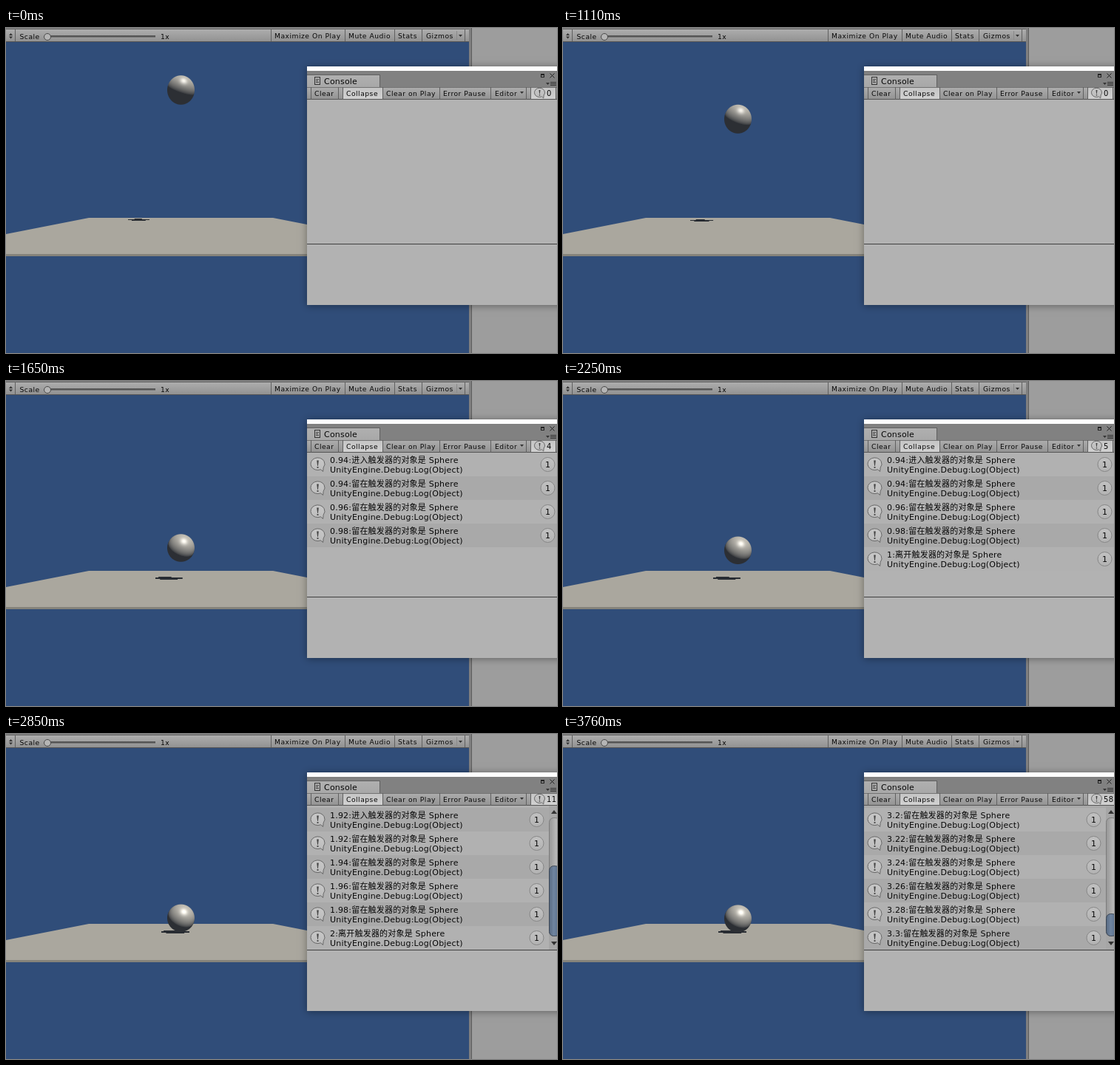
Recreate the animation shown at these times as an HTML page with a canvas. Size 745 px wide and 440 px high, loop 3.82 s.

```html
<!DOCTYPE html>
<html lang="zh">
<head>
<meta charset="utf-8">
<title>Trigger log</title>
<style>
html, body { margin: 0; width: 100%; height: 100%; overflow: hidden; background: #304d79; }
canvas { display: block; }
</style>
</head>
<body>
<canvas id="stage" width="745" height="440"></canvas>
<script>
const ctx = document.getElementById('stage').getContext('2d');
const LOOP = 3820, ROW = 32, LIST_TOP = 97, LIST_BOTTOM = 292;
const SANS = '"DejaVu Sans", sans-serif';
const CJK = '"Noto Sans CJK SC", "Noto Sans CJK", sans-serif';

// Screen time (ms) against simulated time (s)
const CLOCK = [[0, 0], [810, .06], [930, .16], [1290, .774], [1350, .856], [1650, 1.14], [2250, 1.79], [3820, 3.36]];
// Start, end (s) and height (px) of each arc of the ball
const ARCS = [[-.96, .96, 166], [.96, 1.94, 40], [1.94, 2.4, 10], [2.4, 2.64, 2]];

const logs = [];
function addVisit(from, to, leaves) {
  const add = (tick, verb) => logs.push([tick / 50 + ':', verb + '触发器的对象是']);
  add(from, '进入');
  for (let tick = from; tick < to; tick++) add(tick, '留在');
  if (leaves) add(to, '离开');
}
addVisit(47, 50, true);
addVisit(96, 100, true);
addVisit(120, 166, false);

const lerp = (a, b, u) => a + (b - a) * u;

function stepTime(t) {
  if (t < 810) return 0;
  if (t < 930) return 810;
  if (t >= 2430 && t < 2490) return 2370;
  if (t >= 3150) return [3760, 3580, 3330, 3150].find(s => s <= t);
  return 810 + 60 * Math.floor((t - 810) / 60);
}

function simTime(t) {
  const i = CLOCK.findIndex(k => k[0] > t);
  const [t0, g0] = CLOCK[i - 1], [t1, g1] = CLOCK[i];
  return lerp(g0, g1, (t - t0) / (t1 - t0));
}

function ballHeight(g) {
  const arc = ARCS.find(a => g < a[1]);
  if (!arc) return 0;
  const [start, end, height] = arc;
  const x = (2 * g - start - end) / (end - start);
  return height * (1 - x * x);
}

function logCount(t, g) {
  if (t < 1530) return 0;
  if (t < 1710) return 4;
  if (t < 2490) return 5;
  if (t < 2610) return 10;
  if (t < 2910) return 11;
  return Math.min(logs.length, 13 + Math.floor((g - 2.4) * 50 + 1e-6));
}

function rect(x, y, w, h, fill) {
  ctx.fillStyle = fill;
  ctx.fillRect(x, y, w, h);
}

function gradient(x0, y0, x1, y1, ...colors) {
  const g = ctx.createLinearGradient(x0, y0, x1, y1);
  colors.forEach((c, i) => g.addColorStop(i / (colors.length - 1), c));
  return g;
}

function poly(points, fill) {
  ctx.beginPath();
  points.forEach(p => ctx.lineTo(...p));
  ctx.fillStyle = fill;
  ctx.fill();
}

function text(s, x, y, size, spacing, family = SANS) {
  ctx.font = size + 'px ' + family;
  ctx.letterSpacing = spacing + 'px';
  ctx.fillStyle = '#080808';
  ctx.fillText(s, x, y);
  return x + ctx.measureText(s).width;
}

const label = (s, x, y) => text(s, x, y, 9.2, .5);
const body = (s, x, y, family) => text(s, x, y, 11, .2, family);

function circle(x, y, r, fill, stroke) {
  ctx.beginPath();
  ctx.arc(x, y, r, 0, 7);
  ctx.fillStyle = fill;
  ctx.fill();
  ctx.strokeStyle = stroke;
  ctx.lineWidth = 1;
  ctx.stroke();
}

function arrow(x, y, w, h, fill = '#333') {
  poly([[x - w, y], [x + w, y], [x, y + h]], fill);
}

function bubble(x, y, r) {
  ctx.beginPath();
  ctx.ellipse(x, y - r * .08, r, r * .88, 0, Math.PI * .36, Math.PI * 2.2);
  ctx.lineTo(x + r * .75, y + r);
  ctx.closePath();
  ctx.fillStyle = gradient(0, y - r, 0, y + r, '#c8c8c8', '#bcbcbc');
  ctx.fill();
  ctx.strokeStyle = '#686868';
  ctx.lineWidth = 1;
  ctx.stroke();
  poly([[x - r * .14, y - r * .58], [x + r * .14, y - r * .58], [x + r * .04, y + r * .2], [x - r * .04, y + r * .2]], '#444');
  rect(x - r * .1, y + r * .32, r * .2, r * .2, '#444');
}

function dividers(xs, y, h) {
  for (const x of xs) rect(x, y, 1, h, '#606060');
}

function drawScene(height) {
  rect(0, 0, 745, 440, '#304d79');
  poly([[0, 279], [112, 257], [361, 257], [626, 309], [626, 306], [0, 306]], '#aaa79e');
  rect(0, 306, 626, 3, '#85837a');

  const u = 1 - height / 166, s = u ** 1.25;
  const left = Math.round(165 + 45 * s), width = 29 + 9 * u, top = Math.round(258 + 8 * s);
  const dark = '#282c32';
  rect(left + width * lerp(.3, .08, u), top, width * lerp(.35, .5, u), 1, dark);
  rect(left, top + 1, width, 1 + Math.round(u), dark);
  rect(left + width * .17, top + 2 + Math.round(u), width * .65, 1, dark);
  drawBall(236.5, 250 - height, u);
}

// Diffuse shading with a highlight; the light turns with the viewing angle
function drawBall(cx, cy, u) {
  const rx = 18.5, ry = lerp(19.8, 18.6, u);
  const light = [lerp(.3, .36, u), lerp(-.93, -.73, u), lerp(.17, .58, u)];
  const half = [lerp(.2, .22, u), lerp(-.62, -.45, u), lerp(.76, .87, u)];
  for (let y = Math.floor(cy - ry); y <= cy + ry; y++) {
    for (let x = Math.floor(cx - rx); x <= cx + rx; x++) {
      const nx = (x + .5 - cx) / rx, ny = (y + .5 - cy) / ry, d = Math.hypot(nx, ny);
      const alpha = Math.min(1, (1 - d) * rx + .5);
      if (alpha <= 0) continue;
      const nz = Math.sqrt(Math.max(0, 1 - d * d));
      const dot = v => Math.max(0, nx * v[0] + ny * v[1] + nz * v[2]);
      const diffuse = dot(light) ** .7, shine = 78 * dot(half) ** 28;
      const rgb = [44 + 152 * diffuse, 47 + 145 * diffuse, 52 + 130 * diffuse].map(c => c + shine);
      rect(x, y, 1, 1, `rgba(${rgb},${alpha})`);
    }
  }
}

function drawGameBar() {
  rect(0, 0, 630, 2, '#858585');
  rect(0, 1, 626, 1, '#666');
  rect(0, 2, 626, 16, gradient(0, 2, 0, 18, '#adadad', '#929292'));
  rect(0, 18, 626, 1, '#555');
  dividers([12, 358, 458, 525, 562, 620], 2, 16);
  rect(609, 4, 1, 12, '#8b8b8b');
  arrow(6.5, 11.5, 2.5, 3);
  arrow(6.5, 10, 2.5, -3);
  label('Scale', 18.5, 15);
  rect(52, 10, 150, 3, '#555');
  rect(53, 12, 149, 1, '#777');
  circle(56, 12, 4.5, '#b5b5b5', '#4a4a4a');
  label('1x', 209, 15);
  label('Maximize On Play', 363, 14);
  label('Mute Audio', 463, 14);
  label('Stats', 530, 14);
  label('Gizmos', 568, 14);
  arrow(614.5, 9, 2.5, 3);

  rect(626, 0, 4, 440, '#7f7f7f');
  rect(629, 0, 1, 440, '#5d5d5d');
  rect(630, 0, 115, 440, '#9d9d9d');
}

function drawConsole(count) {
  ctx.save();
  ctx.shadowColor = 'rgba(0,0,0,.38)';
  ctx.shadowBlur = 10;
  ctx.shadowOffsetY = 1;
  rect(407, 52, 360, 323, '#b2b2b2');
  ctx.restore();

  rect(407, 52, 338, 6, '#fff');
  rect(407, 58, 338, 22, '#818181');
  rect(407, 63, 99, 17, '#606060');
  rect(407, 64, 98, 16, gradient(0, 64, 0, 80, '#b0b0b0', '#a8a8a8'));
  ctx.strokeStyle = '#333';
  ctx.lineWidth = 1;
  ctx.strokeRect(417.5, 66.5, 7, 10);
  for (const y of [69, 71, 73]) rect(419, y, y === 71 ? 3 : 4, 1, '#444');
  body('Console', 430, 76);

  ctx.strokeStyle = '#222';
  ctx.strokeRect(723.5, 62.5, 4, 4);
  rect(723, 62, 5, 2, '#222');
  ctx.beginPath();
  ctx.moveTo(735.5, 61.5); ctx.lineTo(741.5, 67.5);
  ctx.moveTo(741.5, 61.5); ctx.lineTo(735.5, 67.5);
  ctx.stroke();
  arrow(732.5, 74, 2.5, 3);
  for (const y of [73, 75, 77]) rect(736, y, 8, 1, '#333');

  rect(407, 80, 338, 17, gradient(0, 80, 0, 97, '#adadad', '#929292'));
  const wide = count > 9;
  const pressed = gradient(0, 80, 0, 97, '#c4c4c4', '#d2d2d2');
  rect(455, 80, 54, 16, pressed);
  rect(709, 80, wide ? 36 : 34, 16, pressed);
  rect(407, 80, 338, 1, '#737373');
  rect(407, 96, 338, 1, '#555');
  dividers([412, 449, 455, 509, 586, 655, 703, 709], 80, 17);
  if (!wide) dividers([743], 80, 17);
  label('Clear', 417, 92);
  label('Collapse', 460, 92);
  label('Clear on Play', 514, 92);
  label('Error Pause', 591, 92);
  label('Editor', 661, 92);
  arrow(697.5, 86, 2.5, 3);
  bubble(721.5, 88, 7);
  text(count, 731, 92, 10, .4);

  drawLogs(count);
  rect(407, LIST_BOTTOM, 338, 1, '#404040');
}

function drawLogs(count) {
  const scrolls = count > 6, first = Math.max(0, count - 7);
  const origin = scrolls ? LIST_BOTTOM - count * ROW : LIST_TOP;
  const badgeX = scrolls ? 717 : 732;
  ctx.save();
  ctx.beginPath();
  ctx.rect(407, LIST_TOP, 338, LIST_BOTTOM - LIST_TOP);
  ctx.clip();
  for (let i = first; i < count; i++) {
    const y = origin + i * ROW, [time, message] = logs[i];
    rect(407, y, 338, ROW, i % 2 ? '#a9a9a9' : '#b1b1b1');
    bubble(421.5, y + 16, 9.5);
    let x = body(time, 438, y + 14);
    x = body(message, x, y + 14, CJK);
    body(' Sphere', x, y + 14);
    body('UnityEngine.Debug:Log(Object)', 438, y + 27);
    circle(badgeX + .5, y + 16, 9.5, gradient(0, y + 6, 0, y + 26, '#c2c2c2', '#b2b2b2'), '#868686');
    body('1', badgeX - 3, y + 20);
  }
  if (scrolls) drawScrollbar(count);
  ctx.restore();
}

function drawScrollbar(count) {
  rect(734, LIST_TOP, 11, 195, '#a6a6a6');
  arrow(741, 108, 4, -5);
  arrow(741, 281, 4, 5);
  const pill = (y, h, fill, stroke) => {
    ctx.beginPath();
    ctx.roundRect(734.5, y + .5, 14, h - 1, 6);
    ctx.fillStyle = fill;
    ctx.fill();
    ctx.strokeStyle = stroke;
    ctx.stroke();
  };
  ctx.lineWidth = 1;
  pill(113, 161, gradient(734, 0, 747, 0, '#949494', '#c2c2c2'), '#7c7c7c');
  const h = Math.max(31, 195 / (ROW * count) * 173);
  pill(274 - h, h, gradient(734, 0, 747, 0, '#55677f', '#6f849f', '#5a7190'), '#3c4654');
}

let shown = -1;
function play(now) {
  const t = stepTime(now % LOOP);
  if (t !== shown) {
    shown = t;
    const g = simTime(t);
    drawScene(ballHeight(g));
    drawGameBar();
    drawConsole(logCount(t, g));
  }
  requestAnimationFrame(play);
}
requestAnimationFrame(play);
</script>
</body>
</html>
```
